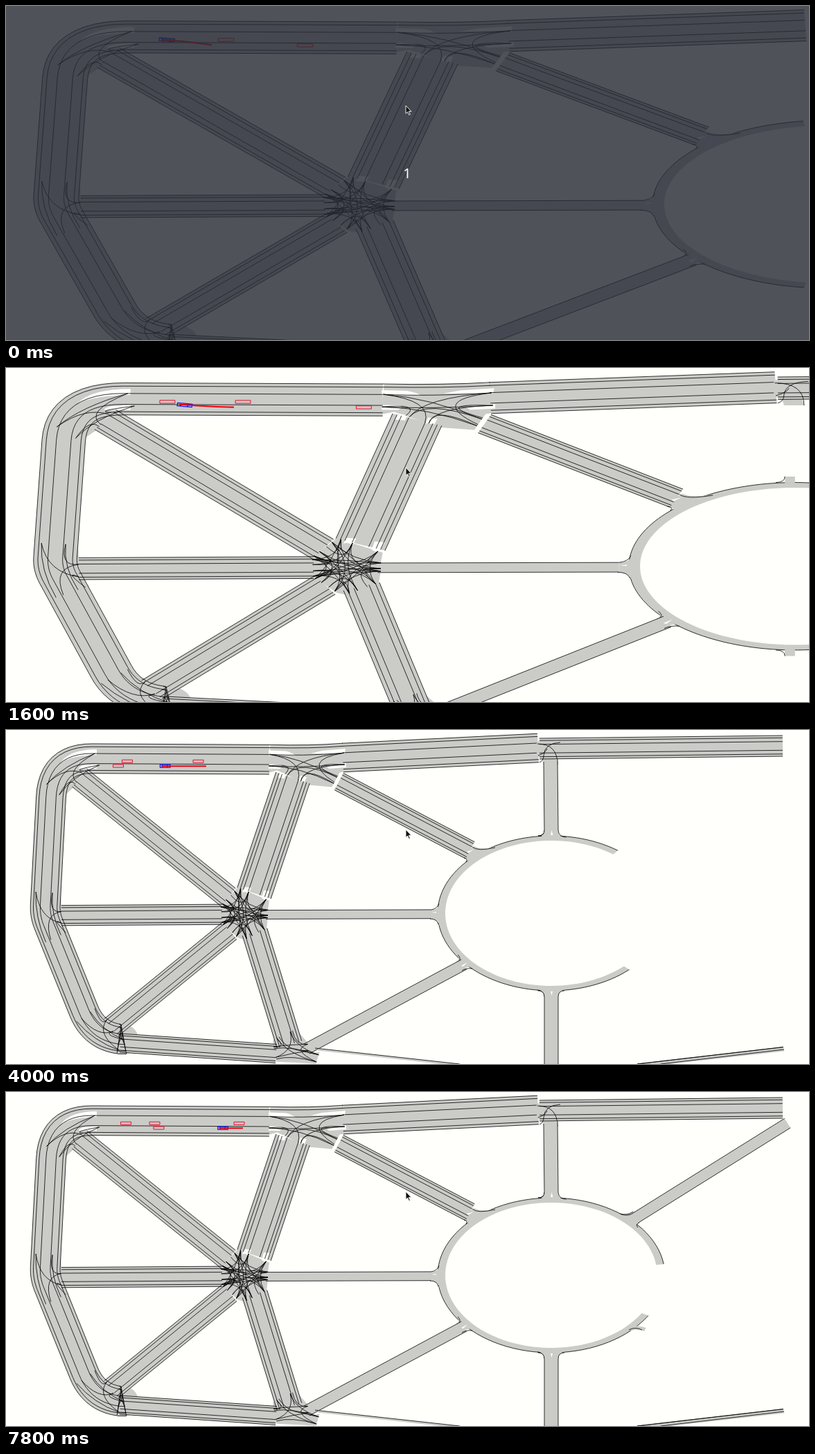
These frames come from a looping animation (1159 by 483 pixels, 8 s). An HTML page:

```html
<!DOCTYPE html>
<html lang="en">
<head>
<meta charset="utf-8">
<title>Road map drive</title>
<style>
html, body { margin: 0; width: 100%; height: 100%; overflow: hidden; background: #fffffc; }
svg { display: block; width: 1159px; height: 483px; }
#map * { vector-effect: non-scaling-stroke; }
#map .road { vector-effect: none; fill: none; stroke: #cbcbc8; stroke-linejoin: round; }
.area { fill: #cbcbc8; }
.gap { fill: #fffffc; }
.line { fill: none; stroke: #000; stroke-width: .8; }
.car { fill: none; stroke: #e8102a; stroke-width: 1; }
#ego { fill: none; stroke: #1010f0; stroke-width: 1.2; }
#plan { fill: none; stroke: #f00010; stroke-width: 2.1; }
</style>
</head>
<body>
<svg viewBox="0 0 1159 483">
  <g id="map"></g>
  <g id="intro">
    <rect width="1159" height="483" fill="#272a34" opacity=".81"/>
    <text x="579" y="249" text-anchor="middle" font-size="20" fill="#fff" font-family="'Noto Sans', 'Open Sans', sans-serif">1</text>
  </g>
  <path d="M577 144v11.5l2.6-2.4 2 4.4 1.8-.8-2-4.3h3.6z" fill="#111" stroke="#fff" stroke-width=".9"/>
</svg>
<script>
const LOOP = 8000;
const WIDE = [1, .8, .34], LANES = [1, .78, .42], EDGES = [1];
const map = document.getElementById('map');
const fmt = v => v.toFixed(2);
const polyline = pts => 'M' + pts.map(p => fmt(p[0]) + ' ' + fmt(p[1])).join('L');
const path = (cls, d, extra = '') => `<path class="${cls}" d="${d}" ${extra}/>`;

let fills, gaps, lines;
const layers = [];

function layer(stage, draw) {
  fills = []; gaps = []; lines = [];
  draw();
  layers.push({ stage, html: fills.join('') + gaps.join('') + lines.join('') });
}
const area = d => fills.push(path('area', d + 'z'));
const gap = d => gaps.push(path('gap', d + 'z'));
const line = d => lines.push(path('line', d));

// Replaces each corner [x, y, radius] by a sampled curve.
function rounded(pts) {
  const toward = (a, b, r) => {
    const k = r / Math.hypot(b[0] - a[0], b[1] - a[1]);
    return [a[0] + (b[0] - a[0]) * k, a[1] + (b[1] - a[1]) * k];
  };
  return pts.flatMap((p, i) => {
    if (!p[2]) return [p];
    const a = toward(p, pts[i - 1], p[2]), b = toward(p, pts[i + 1], p[2]);
    return Array.from({ length: 13 }, (_, j) => {
      const t = j / 12, u = 1 - t;
      return [0, 1].map(c => u * u * a[c] + 2 * u * t * p[c] + t * t * b[c]);
    });
  });
}

function offset(pts, d) {
  return pts.map((p, i) => {
    const a = pts[Math.max(0, i - 1)], b = pts[Math.min(pts.length - 1, i + 1)];
    const dx = b[0] - a[0], dy = b[1] - a[1], n = Math.hypot(dx, dy);
    return [p[0] - dy / n * d, p[1] + dx / n * d];
  });
}

function road(corners, half, profile) {
  const pts = rounded(corners);
  fills.push(path('road', polyline(pts), `stroke-width="${half * 2}"`));
  for (const f of profile) for (const s of [-1, 1]) line(polyline(offset(pts, f * s * half)));
}

// Arms are [x, y, half width], clockwise around the centre.
function junction(cx, cy, arms, tracks) {
  const ends = arms.map(([x, y, half]) => {
    const n = Math.hypot(x - cx, y - cy);
    const nx = -(y - cy) / n * half, ny = (x - cx) / n * half;
    return { nx, ny, at: d => [x + nx * d, y + ny * d] };
  });
  area(polyline(ends.flatMap(e => [e.at(-1), e.at(1)])));
  ends.forEach((a, i) => ends.slice(i + 1).forEach(b => {
    for (const d of tracks) {
      const mid = [cx + (a.nx - b.nx) * d / 2, cy + (a.ny - b.ny) * d / 2];
      line(`${polyline([a.at(d)])}Q${mid.map(fmt)} ${b.at(-d).map(fmt)}`);
    }
  }));
}

layer(0, () => {
  // ring road and its continuation to the east
  road([[380, 42.7], [68, 41, 56], [56, 267, 14], [128, 445, 42], [162, 447]], 21.4, WIDE);
  road([[768, 26], [486, 40]], 20.8, WIDE);
  road([[165, 452.5], [390, 468]], 13.5, LANES);
  // roads around the hub
  road([[106, 69], [321, 242]], 16.7, LANES);
  road([[80, 268.2], [312, 266.7]], 14.6, LANES);
  road([[152, 430], [323, 290]], 16, LANES);
  road([[414, 69], [358, 236]], 25.5, [1, .82, .64, .34]);
  road([[359, 292], [409, 455]], 18.5, LANES);
  // spokes to the roundabout
  road([[480.5, 74.5], [670, 174]], 13.7, LANES);
  road([[375, 267], [613, 266.3]], 6.4, EDGES);
  road([[434, 461], [661, 339]], 8, EDGES);

  junction(345, 265, [[378, 266, 7], [360, 295, 18], [323, 290, 16], [311, 267, 14], [321, 242, 16], [357, 237, 25]], [-.8, .3, .8]);
  junction(425, 45, [[488, 40, 20], [476, 72, 12], [414, 69, 25], [380, 42, 20]], [-.34, .5]);
  junction(88, 58, [[131, 41, 15], [106, 69, 16], [66, 85, 20]], [-.5, .7]);
  junction(57, 268, [[80, 268, 14], [72, 300, 20], [59, 235, 20]], [-.4, .8]);
  junction(135, 440, [[168, 453, 14], [115, 412, 20], [152, 430, 16]], [-.4, .8]);
  junction(412, 462, [[450, 474, 9], [388, 467, 13], [402, 440, 18], [436, 460, 8]], [-.5, .7]);
  line('M380 21.3Q440 23 486 19.2M380 25.5Q440 27 486 23.4');

  gap('M131 28Q92 28 79 47Q98 36 131 36');
  gap('M131 49.5L112 51Q105 53 105 56L131 56');
  gap('M379 29.5L404 30.5Q414 33 418 37L379 36');
  gap('M379 49.5L397 50Q401 53 395 56L379 56');
  gap('M490 27L456 30L440 34L489 34');
  gap('M491 48L462 51L466 56L491 54');
  gap('M395 61L404 63L402 70L392 69');
  gap('M425 66L434 68L431 75L422 74');
  gap('M344 227L354 228L350 237Q346 232 341 235');
  gap('M372 232L382 233L377 245Q374 247 369 243');

  area('M613 260Q623 260 626 252L626 283Q623 274 613 273');
  line('M613 260Q622 259 625 251M612 273Q622 273 624 281');
  area('M676 168Q685 174 706 169L668 192Q666 184 657 181');
  line('M673 169Q680 176 706 170M661 185Q667 185 664 191');
  area('M650 335Q656 332 652 325L676 342Q664 341 658 348');
  line('M654 333Q657 330 652 325M658 348Q664 344 673 345');
  gap('M614 264l7-1v1.5zM665 176l10-3-8 5zM657 341l9-5-6 6z');
});

layer(1, () => {
  road([[770, 27], [1121, 23]], 15, LANES);
  area('M766 16L790 20L796 50L776 50Q776 42 766 37');
  line('M767 20Q796 20 796 50M770 47Q776 44 776 37Q777 19 800 18M768 37Q779 33 781 27');
  area('M777 145h10v9h-10zM777 376h10v9h-10');
  line('M777 145Q777 153 768 153M777 385Q777 377 768 377');
});

layer(2, () => {
  area('M776 46L796 42L797 146Q798 155 807 156L768 156Q776 154 777 146');
  area('M768 375L807 375Q798 377 797 385L797 483L777 483L777 385Q776 378 768 375');
  line('M776 46L777 145Q777 153 768 153M796 42L797 145Q798 155 809 155');
  line('M777 483L777 386Q777 377 767 376M797 483L797 386Q797 377 806 377');
  gap('M786 152l1.5-7 2 7zM786 378l1.5 6 1.5-6z');
  fills.push(path('road', 'M450 462L655 484.5M911 484.5L1122 460.5', 'stroke-width="3"'));
  line('M446 460L655 483M911 483L1122 458.5');
});

layer(3, () => {
  fills.push(path('road', 'M940 483L1123 462.5', 'stroke-width="4"'));
  line('M911 483L1122 458.5M945 483L1123 462');
});

layer(4, () => {
  area('M886 176Q898 179 907 172L911 180L902 187');
  line('M886 176Q897 179 905 173');
});

layer(5, () => {
  area('M897 343Q908 335 924 341L921 346Q911 342 903 345');
  line('M899 344Q908 339 918 344');
});

layer(6, () => {
  road([[909, 182], [1128, 45]], 8, EDGES);
  area('M890 178Q902 180 906 173L914 189Q908 190 911 194');
  line('M888 177Q899 180 905 175M914 189Q908 191 912 196');
});

map.innerHTML =
  '<path class="area" id="ring"/><path class="line" id="rim"/>' +
  layers.map(l => `<g class="layer">${l.html}</g>`).join('') +
  '<g id="cars"></g><path id="ego"/><path id="plan"/>';
const [ring, rim, carGroup, ego, plan, intro] =
  ['ring', 'rim', 'cars', 'ego', 'plan', 'intro'].map(id => document.getElementById(id));
const groups = map.querySelectorAll('.layer');

// The roundabout is open to the east; its ends are given by their x.
function drawRing(topX, bottomX) {
  const angle = x => Math.acos((x - 787) / 164);
  const from = angle(topX), to = 2 * Math.PI - angle(bottomX);
  const arc = (rx, ry) => Array.from({ length: 91 }, (_, i) => {
    const a = from + (to - from) * i / 90;
    return [787 + rx * Math.cos(a), 265 - ry * Math.sin(a)];
  });
  const outer = arc(164, 112);
  rim.setAttribute('d', polyline(outer));
  ring.setAttribute('d', polyline([...outer, ...arc(153, 105).reverse()]) + 'z');
}

const stageStarts = [0, 1200, 2300, 2900, 5900, 6900, 7700];
const ringEnds = [[766, 767], [808, 808], [809, 810], [883, 899.5], [914, 899.5], [914, 927], [949.3, 927]];
const views = ['1.52 0 0 1.082 -13.7 0', '1.462 0 0 1.082 -11.8 0', '1 0 0 1 0 0'];

// Cars: lane y and [time, x] stops; a car exists only between its stops.
const cars = [
  { y: 45.3, stops: [[0, 217.9], [100, 220.9], [1600, 242], [2300, 252.5], [4000, 277.5], [6400, 313.5], [7800, 336.5], [LOOP, 337]] },
  { y: 52.6, stops: [[0, 292.9], [100, 299.8], [1600, 361.3], [2300, 377], [2500, 381]] },
  { y: 45.2, stops: [[1100, 167], [1600, 167.4], [2300, 168.5], [4000, 175], [6400, 194.5], [7800, 214.5], [LOOP, 215]] },
  { y: 52, stops: [[3400, 161.5], [4000, 162], [5100, 169], [6400, 186.5], [7800, 220.5], [LOOP, 221]] },
  { y: 45.2, stops: [[5400, 167], [6400, 168], [7800, 173], [LOOP, 173.2]] }
];
// Ego: time, x, y, heading, end of the planned path.
const egoStops = [
  [0, 161.7, 45.2, 6, 204.4], [100, 163.7, 45.3, 6, 208.4], [1600, 184.5, 49.4, 7, 233], [2300, 197, 51.2, 3, 244],
  [4000, 229.7, 52.2, 0, 289], [6400, 283.3, 52.2, 0, 330], [7800, 313, 52.2, 0, 342], [LOOP, 313.4, 52.2, 0, 342]
];

function at(stops, t) {
  const i = Math.max(1, stops.findIndex(s => s[0] >= t));
  const a = stops[i - 1], b = stops[i], k = (t - a[0]) / (b[0] - a[0]);
  return a.map((v, j) => v + (b[j] - v) * k);
}

carGroup.innerHTML = cars.map(() => '<rect class="car" x="-7.5" y="-2" width="15" height="4"/>').join('');
ego.setAttribute('d', 'M-7.3-2h14.6v4h-14.6zM-4-2v4M3-2v4');

let shown = -1;
function setStage(stage) {
  if (stage === shown) return;
  shown = stage;
  groups.forEach((g, i) => { g.style.display = layers[i].stage <= stage ? '' : 'none'; });
  map.setAttribute('transform', `matrix(${views[Math.min(stage, 2)]})`);
  drawRing(...ringEnds[stage]);
}

function render(t) {
  setStage(stageStarts.filter(s => s <= t).length - 1);
  intro.style.display = t < 100 ? '' : 'none';

  cars.forEach(({ y, stops }, i) => {
    const el = carGroup.children[i];
    const alive = t >= stops[0][0] && t <= stops[stops.length - 1][0];
    el.style.display = alive ? '' : 'none';
    if (alive) el.setAttribute('transform', `translate(${at(stops, t)[1]} ${y})`);
  });

  const [, x, y, heading, end] = at(egoStops, t);
  ego.setAttribute('transform', `translate(${x} ${y}) rotate(${heading})`);
  const startX = x - 5.5, slope = Math.tan(heading * Math.PI / 180);
  const bendX = startX + (end - startX) * .6;
  plan.setAttribute('d', `M${startX} ${y - 5.5 * slope}Q${bendX} ${Math.min(52, y + slope * (bendX - x)) + .2} ${end} 52.3`);
}

function tick() {
  render(performance.now() % LOOP);
  requestAnimationFrame(tick);
}
tick();
</script>
</body>
</html>
```
